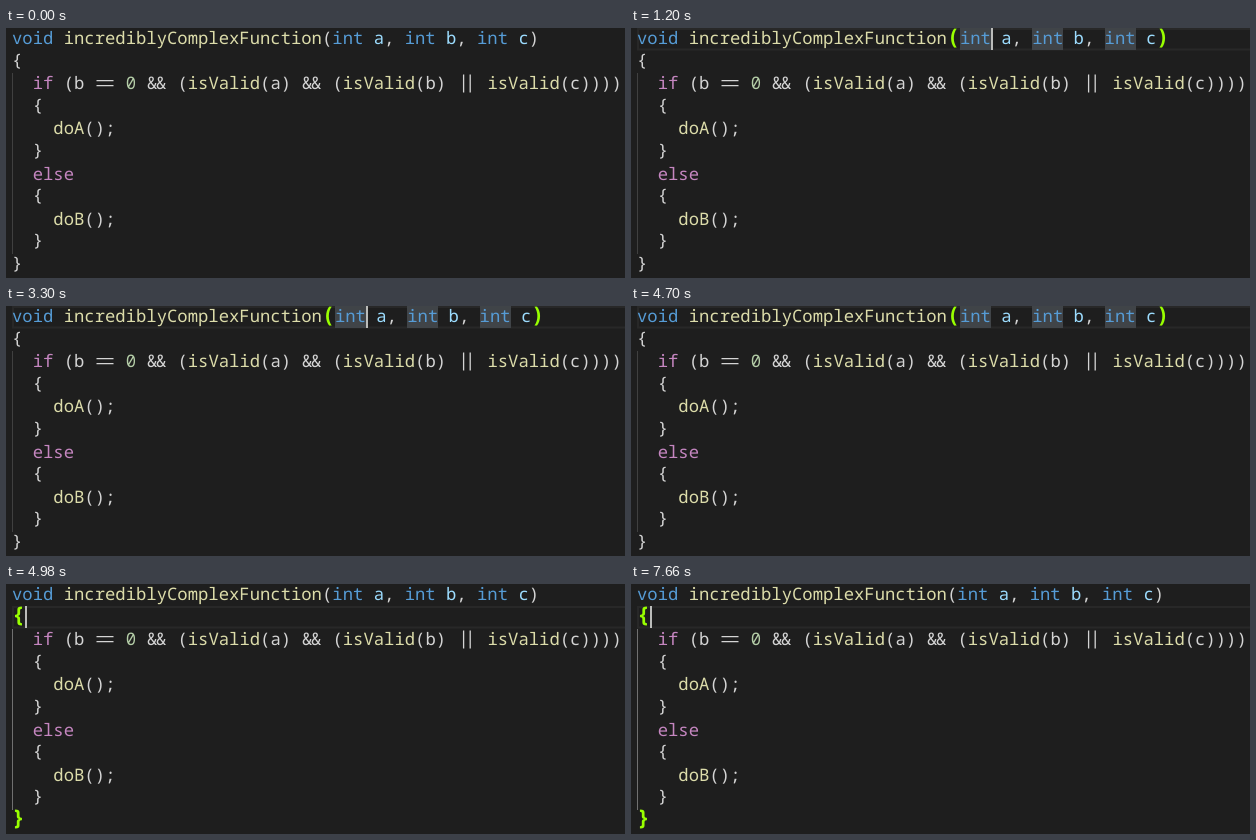
Animation of 619x250 px, one loop 8 s. Source, as an HTML page:

```html
<!DOCTYPE html>
<html lang="en">
<head>
<meta charset="utf-8">
<title>Bracket matching</title>
<style>
html, body { margin: 0; width: 100%; height: 100%; overflow: hidden; background: #1e1e1e; }
svg, pre { position: absolute; left: 0; top: 0; }
svg { width: 619px; height: 250px; }
pre {
  left: 6px; margin: 0;
  font: 17.225px/22.6px "Noto Sans Mono", "DejaVu Sans Mono", monospace;
  font-variant-ligatures: none;
  text-rendering: geometricPrecision;
  color: #d4d4d4;
}
b, i { font-weight: 400; font-style: normal; }
.k { color: #569cd6; }
.f { color: #dcdcaa; }
.v { color: #9cdcfe; }
.c { color: #c586c0; }
.n { color: #b5cea8; }
.lig { color: transparent; }
.and { position: relative; left: .5px; }
.and + .and { left: -.8px; }
.curly { position: relative; top: -1px; }

.paren, .brace, .word, .cursor, .guide, .line { animation: 8s step-end infinite; }
.paren, .brace { line-height: 0; }
.paren { animation-name: paren; }
.brace { position: relative; top: -1px; animation-name: brace; }
.word { fill: #404448; animation-name: word; }
.cursor { fill: #bbbcba; animation-name: cursor; }
.guide { fill: #404040; animation-name: guide; }
.line { fill: none; stroke: #282828; stroke-width: 2; animation-name: line; }

@keyframes paren {
  0%, 62.25%, 100% { color: #d4d4d4; font-size: 1em; font-weight: 400; }
  6.5% { color: #9f0; font-size: 1.25em; font-weight: 700; }
}
@keyframes brace {
  0%, 100% { color: #d4d4d4; font-size: 1em; font-weight: 400; }
  62.25% { color: #9f0; font-size: 1.25em; font-weight: 700; }
}
@keyframes word {
  0%, 61%, 100% { opacity: 0; }
  15% { opacity: 1; }
}
@keyframes cursor {
  0%, 100% { opacity: 0; transform: translate(357px, 0); }
  6.25% { opacity: 1; transform: translate(357px, 0); }
  6.5%, 41.25% { opacity: 1; transform: translate(360px, 0); }
  23.75%, 58.75% { opacity: 0; transform: translate(360px, 0); }
  61% { opacity: 1; transform: translate(17px, 22px); }
  62.25%, 95.75% { opacity: 1; transform: translate(19px, 22px); }
  78.5% { opacity: 0; transform: translate(19px, 22px); }
}
@keyframes guide {
  0%, 100% { fill: #404040; }
  61% { fill: #707070; }
}
@keyframes line {
  0%, 100% { opacity: 0; transform: translate(0, 0); }
  6.25% { opacity: 1; transform: translate(0, 0); }
  61% { opacity: 1; transform: translate(0, 22px); }
}
</style>
</head>
<body>
<svg viewBox="0 0 619 250">
  <rect class="line" x="7" y="1" width="620" height="20.5"/>
  <g class="word">
    <rect x="329" width="31" height="22"/>
    <rect x="401" width="31" height="22"/>
    <rect x="474" width="31" height="22"/>
  </g>
  <rect class="guide" x="6" y="45" width="1" height="181"/>
</svg>
<pre><b class="k">void</b> <b class="f">incrediblyComplexFunction</b><i class="paren">(</i><b class="k">int</b> <b class="v">a</b>, <b class="k">int</b> <b class="v">b</b>, <b class="k">int</b> <b class="v">c</b><i class="paren">)</i>
<i class="brace">{</i>
  <b class="c">if</b> (b <b class="lig">==</b> <b class="n">0</b> <b class="and">&amp;</b><b class="and">&amp;</b> (<b class="f">isValid</b>(a) <b class="and">&amp;</b><b class="and">&amp;</b> (<b class="f">isValid</b>(b) <b class="lig">||</b> <b class="f">isValid</b>(c))))
  <b class="curly">{</b>
    <b class="f">doA</b>();
  <b class="curly">}</b>
  <b class="c">else</b>
  <b class="curly">{</b>
    <b class="f">doB</b>();
  <b class="curly">}</b>
<i class="brace">}</i></pre>
<svg viewBox="0 0 619 250">
  <path d="M90.5 52.7h17M90.5 57.7h17M457.6 46.5v18M464.2 46.5v18" stroke="#d4d4d4" stroke-width="1.3"/>
  <rect class="cursor" width="2" height="22"/>
</svg>
</body>
</html>
```
